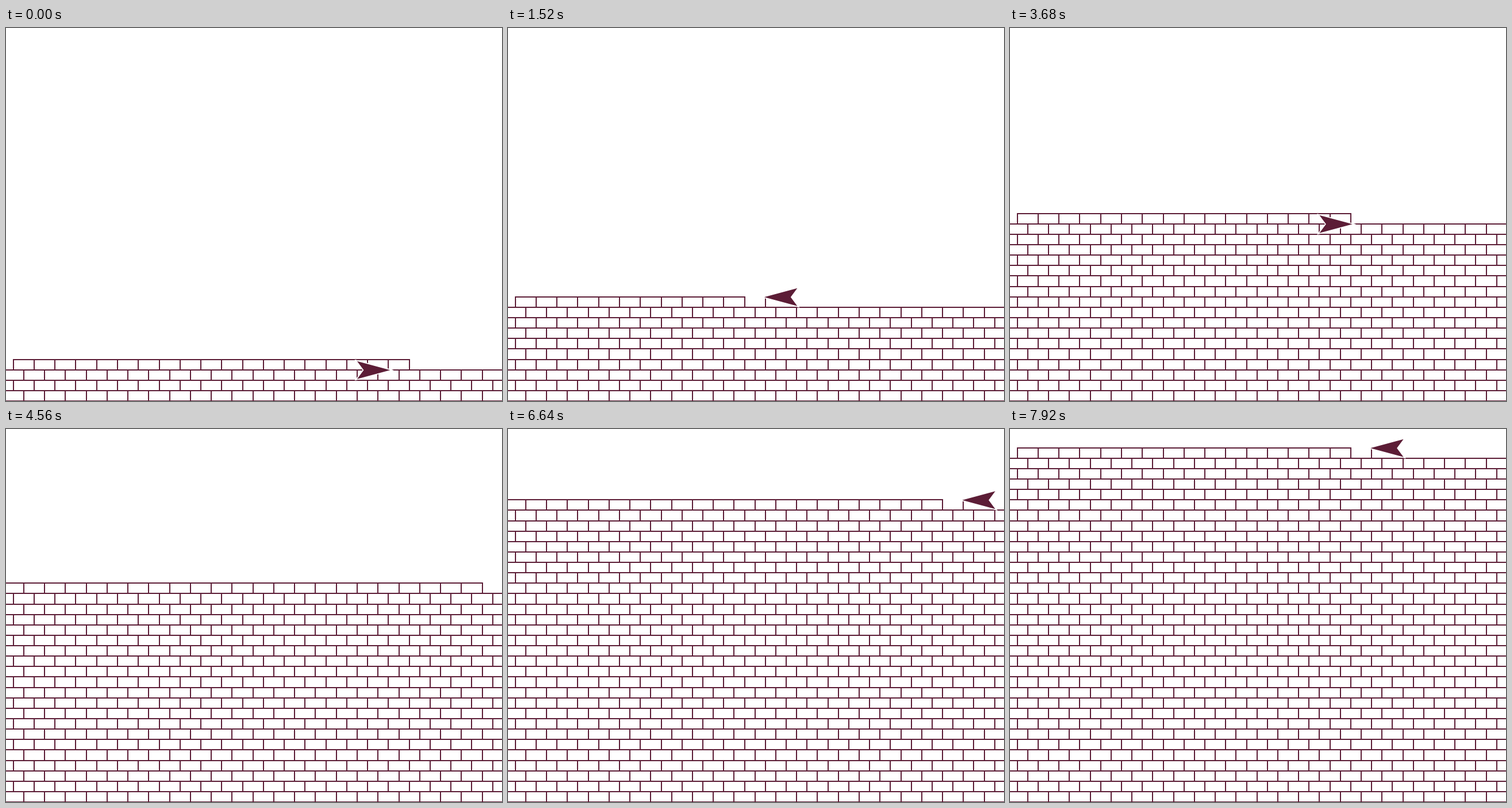
Animation of 863x649 px, one loop 8000 ms. Source, as an HTML page with a canvas:

```html
<!DOCTYPE html>
<html lang="en">
<head>
<meta charset="utf-8">
<title>Brick wall</title>
<style>
html, body { margin: 0; width: 100%; height: 100%; overflow: hidden; background: #fff; }
canvas { display: block; }
</style>
</head>
<body>
<canvas id="stage" width="863" height="649"></canvas>
<script>
const ctx = document.getElementById('stage').getContext('2d');
const INK = '#5c1d36';
const STEP = 80, STEPS = 100;
const BRICK_W = 36.26, BRICK_H = 18.13, PER_ROW = 24;
const POSES = 3; // per brick: arrived, right side drawn, closed

// [step, poses passed since the first brick]
const PACE = [[0, 272], [11, 508], [19, 682], [35, 1035], [44, 1229], [46, 1272],
  [69, 1771], [83, 2080], [87, 2167], [99, 2425]];

const colX = (row, k) => (row % 2 ? 12.2 : 12.2 - BRICK_H) + k * BRICK_W;
const lineY = row => 648.55 - row * BRICK_H;

function poseAt(step) {
  const n = Math.max(1, PACE.findIndex(p => p[0] >= step));
  const [s0, p0] = PACE[n - 1], [s1, p1] = PACE[n];
  return Math.floor(p0 + (p1 - p0) * (step - s0) / (s1 - s0));
}

function hLine(row, line, count) {
  const x = Math.floor(colX(row, 0));
  ctx.fillRect(x, Math.floor(lineY(line)), Math.floor(colX(row, count)) + 2 - x, 2);
}

function vLine(row, k) {
  const y = Math.floor(lineY(row + 1));
  ctx.fillRect(Math.floor(colX(row, k)), y, 2, Math.floor(lineY(row)) + 2 - y);
}

function bricks(row, count) {
  if (!count) return;
  hLine(row, row, count);
  hLine(row, row + 1, count);
  for (let k = 0; k <= count; k++) vLine(row, k);
}

function arrow(x, y, dir) {
  ctx.save();
  ctx.translate(x + 1, y + 1);
  ctx.scale(dir, 1);
  ctx.beginPath();
  ctx.moveTo(2.5, 0);
  ctx.lineTo(-55, -15.5);
  ctx.lineTo(-43.5, 0);
  ctx.lineTo(-55, 15.5);
  ctx.closePath();
  ctx.lineWidth = 3.4;
  ctx.strokeStyle = '#fff';
  ctx.stroke();
  ctx.fill();
  ctx.restore();
}

function draw(step) {
  const pose = poseAt(step);
  const total = Math.floor(pose / POSES), phase = pose % POSES;
  const row = Math.floor(total / PER_ROW), k = total % PER_ROW;

  ctx.fillStyle = '#fff';
  ctx.fillRect(0, 0, 863, 649);
  ctx.fillStyle = INK;
  for (let r = 0; r < row; r++) bricks(r, PER_ROW);
  bricks(row, phase === 2 ? k + 1 : k);

  if (phase === 1) {
    hLine(row, row, k + 1);
    vLine(row, k + 1);
    arrow(colX(row, k + 1), lineY(row + 1), -1);
  } else {
    arrow(colX(row, k), lineY(row), 1);
  }
}

let shown = -1;
function tick() {
  const step = Math.floor(performance.now() / STEP) % STEPS;
  if (step !== shown) draw(shown = step);
  requestAnimationFrame(tick);
}
tick();
</script>
</body>
</html>
```
